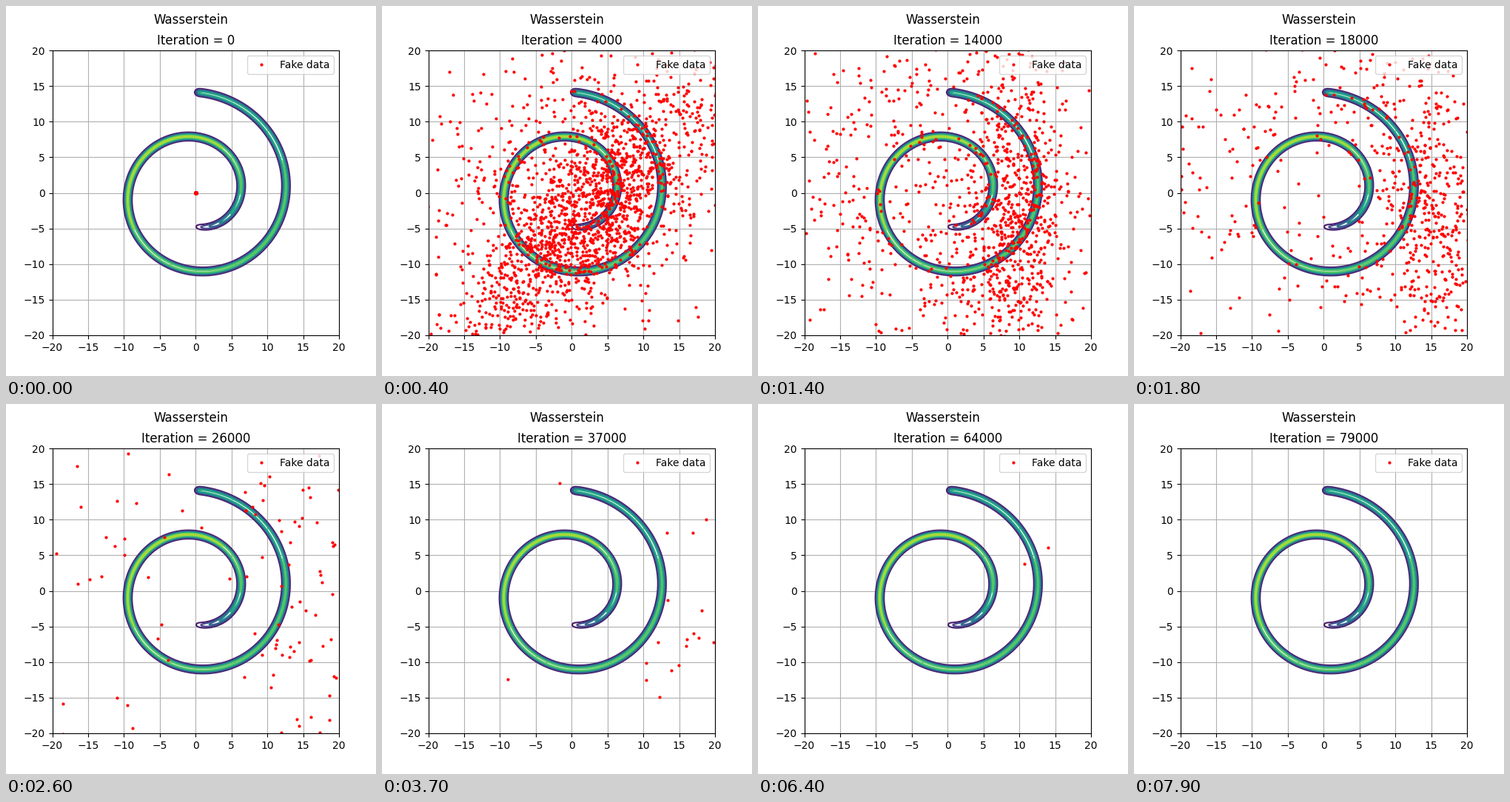
Animation, 500 px wide and 500 px high, one loop 8 s. Source, as a matplotlib script:

```python
import numpy as np
import matplotlib.pyplot as plt
from matplotlib.animation import FuncAnimation

FRAMES, INTERVAL = 80, 100
SIGMA = 0.3


def ramp(k, start, end):
    return np.clip((k - start) / (end - start), 0, 1)


def roll_density():
    """Gaussian blur along the spiral r = t, thinner at the inner tip."""
    t = np.linspace(1.5 * np.pi, 14.12, 700)
    height = 81.8 / t * (1 - np.exp(-(t - 4.5) / 2.85))
    ds = np.hypot(1, t) * (t[1] - t[0])
    weight = height * ds / (SIGMA * np.sqrt(2 * np.pi))
    g = np.linspace(-13, 16, 360)

    def bump(center):
        return np.exp(-(g[:, None] - center) ** 2 / (2 * SIGMA ** 2))

    return g, (bump(t * np.sin(t)) * weight) @ bump(t * np.cos(t)).T


def fake_points(k):
    """A tilted ridge inside a wide halo; both drift out and thin away."""
    rng = np.random.default_rng(100 + k)
    if k == 0:
        return rng.normal(0, 0.03, (200, 2))

    turn, drift = ramp(k, 4, 10), ramp(k, 10, 18)
    count = np.exp(np.interp(k, [10, 18, 26, 49, 79],
                             np.log([2000, 900, 120, 6, 1.5])))
    n = int(count + rng.random())

    a = np.radians(48 + 35 * turn + 15 * drift)
    along = rng.normal(0, 12.5 - 4 * turn + 2.5 * drift, n)
    across = rng.normal(0, 4 - 0.7 * turn + 0.7 * drift, n)
    ridge = np.column_stack([
        2.5 + 2 * turn + 9.5 * drift + along * np.cos(a) - across * np.sin(a),
        -3 + along * np.sin(a) + across * np.cos(a)])
    halo = rng.normal(0, 10 + 4 * drift, (n, 2))
    in_halo = rng.random((n, 1)) < 0.33 + 0.17 * turn
    pts = np.where(in_halo, halo, ridge) * np.sqrt(ramp(k, 0, 4))

    # The middle empties as the cloud spreads out
    hole = 0.95 * drift * np.exp(-(pts ** 2).sum(axis=1) / 90)
    return pts[rng.random(n) > hole]


fig, ax = plt.subplots(figsize=(5, 5), dpi=100)
fig.suptitle("Wasserstein")
g, z = roll_density()
ax.contour(g, g, z, levels=np.arange(1, 8), cmap="viridis",
           vmin=0.5, vmax=8, linewidths=1.5)
dots, = ax.plot([], [], "r.", ms=4, label="Fake data")
ax.set(xlim=(-20, 20), ylim=(-20, 20))
ax.grid(True)
ax.legend(loc="upper right")
title = ax.set_title("")


def update(k):
    dots.set_data(*fake_points(k).T)
    title.set_text(f"Iteration = {1000 * k}")
    return dots, title


anim = FuncAnimation(fig, update, frames=FRAMES, interval=INTERVAL,
                     repeat=True, repeat_delay=0)
plt.show()
```
